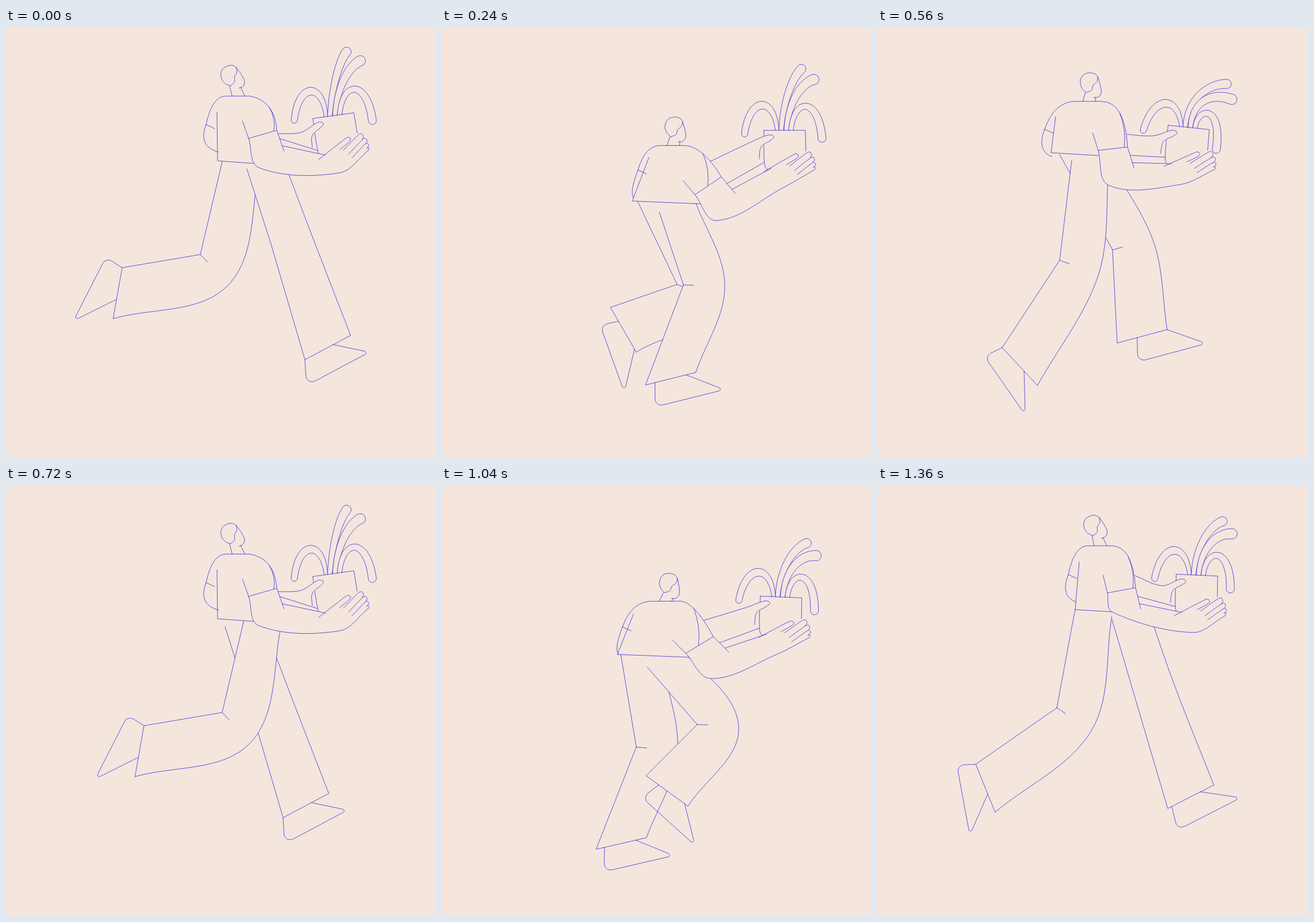
Write an HTML page with a canvas that moves like this. It is 748 px wide and 748 px high and loops after 1440 ms.

```html
<!DOCTYPE html>
<html lang="en">
<head>
<meta charset="utf-8">
<title>Running with a plant</title>
<style>
html, body { margin: 0; width: 100%; height: 100%; overflow: hidden; background: #f4e6dd; }
canvas { display: block; width: 748px; height: 748px; }
</style>
</head>
<body>
<canvas id="stage" width="748" height="748"></canvas>
<script>
const PAPER = '#f4e6dd', INK = 'rgba(52, 44, 220, .78)';
const STEP = 80, STEPS = 18, HALF = 9, HIP_GAP = 38;
const KNEE = 72, HEM = 90, HIP = 65, SOLE = 124, CUFF = 38;
const ctx = document.getElementById('stage').getContext('2d');

// Joints by step: hip, knee, hem, (hem angle, heel offset).
const legAt = track({
  0: '419,245 461,376 520,577 -28,-19',
  3: '378,320 420,447 354,621 -14,7',
  4: '349,293 376,454 306,632 -13,5',
  6: '315,252 278,430 231,611 18,-3',
  7: '337,230 316,404 216,556 47,-10',
  8: '381,214 349,386 208,484 68,-11',
  9: '418,216 376,394 240,417 100,-13',
  12: '378,301 447,446 331,486 60,18',
  13: '357,315 444,415 355,504 36,17',
  15: '331,282 448,390 426,521 10,33',
  16: '354,220 446,386 454,548 -15,26',
  17: '407,232 447,368 504,561 -27,-2'
}, STEPS);

// Head, (head tilt, hand turn), far cuff, shoulder, cuff out and in, hem, elbow, hand, far arm.
const bodyAt = track({
  0: '392,85 -22,-8 348,168 468,127 471,178 422,192 368,231 440,243 597,191 473,184',
  3: '405,175 -2,0 341,247 454,206 486,259 440,290 331,301 478,335 618,220 467,232',
  4: '395,172 3,2.5 314,245 436,195 472,262 424,291 305,293 468,335 610,236 451,235',
  6: '367,144 5,7.5 276,211 414,179 425,238 377,262 268,251 412,312 563,231 416,212',
  7: '369,98 -3,6 290,176 430,127 434,207 383,213 301,217 402,274 558,217 433,185',
  8: '376,71 -20,2.5 331,154 443,105 448,177 399,186 343,215 407,219 575,198 447,156'
}, HALF);

function parse(text) {
  return text.split(' ').map(p => p.split(',').map(Number));
}

// Cyclic cubic interpolation through the key poses.
function track(keys, period) {
  const times = Object.keys(keys).map(Number);
  const poses = times.map(t => parse(keys[t]));
  const n = times.length;
  const timeAt = i => times[(i + n) % n] + Math.floor(i / n) * period;
  const poseAt = i => poses[(i + n) % n];
  return time => {
    const t = time % period;
    let i = n - 1;
    while (times[i] > t) i--;
    const near = [i - 1, i, i + 1, i + 2];
    const [t0, t1, t2, t3] = near.map(timeAt);
    const [A, B, C, D] = near.map(poseAt);
    const h = t2 - t1, u = (t - t1) / h;
    return B.map((p, j) => p.map((b, k) => {
      const c = C[j][k];
      const m1 = (c - A[j][k]) / (t2 - t0) * h;
      const m2 = (D[j][k] - b) / (t3 - t1) * h;
      return b + (c - b) * u * u * (3 - 2 * u) + m1 * u * (1 - u) ** 2 - m2 * u * u * (1 - u);
    }));
  };
}

const clamp = (v, lo = 0, hi = 1) => Math.min(Math.max(v, lo), hi);
const add = (p, q, k = 1) => [p[0] + q[0] * k, p[1] + q[1] * k];
const mix = (p, q, t) => [p[0] + (q[0] - p[0]) * t, p[1] + (q[1] - p[1]) * t];
const polar = deg => [Math.cos(deg * Math.PI / 180), Math.sin(deg * Math.PI / 180)];
const normal = ([x, y]) => [y, -x];

function unit(p, q) {
  const d = Math.hypot(q[0] - p[0], q[1] - p[1]) || 1;
  return [(q[0] - p[0]) / d, (q[1] - p[1]) / d];
}

// Turns local points about an anchor.
function place(text, anchor, deg) {
  const [c, s] = polar(deg);
  return parse(text).map(([x, y]) => add(anchor, [x * c - y * s, x * s + y * c]));
}

// Smooth curve through points.
function curve(pts, joined) {
  const dir = i => unit(pts[Math.max(i - 1, 0)], pts[Math.min(i + 1, pts.length - 1)]);
  joined ? ctx.lineTo(...pts[0]) : ctx.moveTo(...pts[0]);
  for (let i = 1; i < pts.length; i++) {
    const p = pts[i - 1], q = pts[i];
    const h = Math.hypot(q[0] - p[0], q[1] - p[1]) / 3;
    ctx.bezierCurveTo(...add(p, dir(i - 1), h), ...add(q, dir(i), -h), ...q);
  }
}

function line(...pts) {
  pts.forEach((p, i) => i ? ctx.lineTo(...p) : ctx.moveTo(...p));
}

function draw(shape) {
  ctx.beginPath();
  shape();
  ctx.stroke();
}

function mask(shape) {
  ctx.beginPath();
  shape();
  ctx.fill();
}

function drawLeg(pose, dx, opaque) {
  const [hip, knee, hem] = pose.map(p => add(p, [dx, 0]));
  const [hemAngle, offset] = pose[3];
  const thigh = unit(hip, knee), shin = unit(knee, hem), along = polar(hemAngle);
  const across = normal(unit([0, 0], add(thigh, shin)));
  const front = [add(hip, normal(thigh), HIP), add(knee, across, KNEE), add(hem, along, HEM)];
  if (opaque) mask(() => {
    const top = Math.min(hip[1], front[0][1]);
    line(hip, knee, hem);
    curve([...front].reverse(), true);
    ctx.lineTo(front[0][0], top);
    ctx.lineTo(hip[0], top);
  });
  const bent = thigh[0] * shin[1] - thigh[1] * shin[0] > .12;
  draw(() => {
    line(hip, knee, hem, front[2]);
    curve(front);
    if (bent) line(knee, add(knee, across, 18));
  });

  // The shoe hangs from the hem; the ankle bends as the foot lifts.
  const flex = Math.max(hemAngle, 0) * .17;
  const heel = add(add(hem, along, offset), normal(along), Math.min(flex, 10) - 41);
  const toe = add(heel, polar(hemAngle + flex), SOLE);
  const from = clamp((offset + 10) / HEM);
  const back = add(hem, along, HEM * from);
  const instep = add(hem, along, HEM * clamp(from + .62));
  draw(() => {
    ctx.moveTo(...back);
    ctx.arcTo(...heel, ...toe, 11);
    ctx.arcTo(...toe, ...instep, 3);
    ctx.lineTo(...instep);
  });
}

function drawHead(head, tilt, neck) {
  const at = text => place(text, head, tilt);
  draw(() => {
    curve(at('-7,14 -14,7 -17,-4 -12,-16 -2,-20 9,-18 14,-12'));
    curve(at('14,-12 12,-4 5,2 2,10 -7,14'));
    curve(at('14,-12 18,5 18,17 12,23 5,23'));
    const [left, right] = at('-9,14 8,23');
    line(left, add(neck, [-11, 0]));
    line(right, add(neck, [11, 0]));
  });
}

function drawShirt(neck, farCuff, shoulder, cuffOut, cuffIn, hem, elbow) {
  const left = add(neck, [-20, 0]), right = add(neck, [20, 0]);
  const farShoulder = [mix(farCuff, left, .3)[0], neck[1] - 2];
  const hemY = hem[1] + 5;
  const hemEnd = mix(cuffIn, elbow, clamp((hemY - cuffIn[1]) / (elbow[1] - cuffIn[1])));
  const outline = () => {
    ctx.moveTo(...farCuff);
    ctx.quadraticCurveTo(...farShoulder, ...left);
    ctx.lineTo(...right);
    ctx.quadraticCurveTo(...shoulder, ...cuffOut);
  };
  mask(() => {
    outline();
    for (const p of [cuffIn, hemEnd, hem]) ctx.lineTo(...p);
  });
  draw(() => {
    outline();
    line(add(farCuff, [19, -22]), hem, hemEnd);
    line(farCuff, add(farCuff, [15, 7]));
    ctx.moveTo(...farCuff);
    ctx.quadraticCurveTo(farCuff[0] - 15, farCuff[1] + 38, hem[0] + 2, farCuff[1] + 48);

    // Sleeve fold, dropping from the shoulder to the cuff.
    const top = mix(mix(right, shoulder, .5), mix(shoulder, cuffOut, .5), .5);
    const x = Math.min(top[0] + 8, cuffOut[0]);
    const end = mix(cuffIn, cuffOut, (x - cuffIn[0]) / (cuffOut[0] - cuffIn[0]));
    ctx.moveTo(...top);
    ctx.quadraticCurveTo(x + 4, (top[1] + end[1]) / 2, ...end);
  });
}

function drawFarArm(at, start, under) {
  const [wrist, ...thumb] = at('-82,-21 -50,-34 -41,-31 -46,-25 -63,-13');
  const shape = [start, wrist, ...thumb];
  mask(() => curve(shape));
  draw(() => {
    curve([...shape, ...at('-66,8')]);
    line(under, ...at('-58,14'));
  });
}

function drawNearArm(at, cuffOut, cuffIn, elbow) {
  const upper = unit(cuffIn, elbow);
  const cuffEnd = add(cuffOut, upper, CUFF), inner = add(cuffOut, upper, CUFF * .75);
  const [palm, wrist, side, root] = at('-25,58 -45,24 29,27 -58,30');
  const under = [cuffIn, elbow, palm, side];
  mask(() => {
    curve(under);
    for (const p of [...at('31,21 30,10 25,0 20,-4 0,0'), wrist, inner, cuffEnd, cuffOut]) ctx.lineTo(...p);
  });
  draw(() => {
    curve([add(cuffIn, upper, -32), ...under]);
    line(cuffIn, cuffOut, cuffEnd);
    line(inner, wrist);
    curve([root, ...at('-6,0 -1,-1 2,2 0,6 -19,18')]);
    curve(at('-13,20 17,-3 22,-4 25,1 22,6'));
    curve(at('-5,28 23,6 28,5 30,10 27,14'));
    curve(at('0,35 27,14 30,14 32,18 28,22'));
    curve(at('28,22 31,22 31,25 29,27'));
  });
}

// Leaf along a cubic midrib, widening from root to tip.
function drawLeaf(root, c1, c2, end, widths) {
  const N = 28, left = [], right = [];
  const [thin, middle, round] = widths;
  const rib = [[0, 0], c1, c2, end].map(p => add(root, p));
  let angle;
  for (let i = 0; i <= N; i++) {
    const t = i / N;
    const [a, b, c] = [0, 1, 2].map(k => mix(rib[k], rib[k + 1], t));
    const p = mix(a, b, t), q = mix(b, c, t), dir = unit(p, q), mid = mix(p, q, t);
    const w = t < .5 ? thin + (middle - thin) * t * 2 : middle + (round - middle) * (t * 2 - 1);
    angle = Math.atan2(dir[1], dir[0]);
    left.push(add(mid, normal(dir), -w));
    right.unshift(add(mid, normal(dir), w));
  }
  const shape = () => {
    line(...left);
    ctx.arc(...rib[3], round, angle + Math.PI / 2, angle - Math.PI / 2, true);
    right.forEach(p => ctx.lineTo(...p));
  };
  mask(shape);
  draw(shape);
}

function drawStalk(root, tip, widths) {
  drawLeaf(root, [3, -46], [tip[0] * .52, tip[1] * .5 - 38], tip, widths);
}

function drawArch(root, side, rise, tip, widths) {
  drawLeaf(root, [side * 5, rise], [side * 48, rise], tip, widths);
}

function drawPlant(at, turn) {
  const sway = clamp((turn + 1) / 7);
  const roots = at('-35,-42 -28,-42 -19,-42 -11,-42');
  drawArch(roots[0], -1, -60 + 5 * sway, [-55 - 11 * sway, 6], [3, 7, 5.5]);
  drawStalk(roots[1], [29 + 43 * sway, -112 + 37 * sway], [4, 6, 8]);
  drawStalk(roots[2], [44 + 28 * sway, -95 + 46 * sway], [4, 6.5, 9]);
  drawArch(roots[3], 1, -61 + 22 * sway, [57 - 20 * sway, 10 + 27 * sway], [4, 5.5, 7]);
  draw(() => {
    line(...at('15,-6 14,-42 -58,-42'));
    curve(at('-58,-42 -57,17 -50,30'));
  });
}

function render(step) {
  ctx.fillStyle = PAPER;
  ctx.strokeStyle = INK;
  ctx.lineWidth = 1;
  ctx.lineCap = ctx.lineJoin = 'round';
  ctx.fillRect(0, 0, 748, 748);

  const [head, [tilt, turn], farCuff, shoulder, cuffOut, cuffIn, hem, elbow, hand, farArm] = bodyAt(step);
  const neck = add(head, [-4 - .75 * tilt, 29 - .2 * tilt]);
  const carried = text => place(text, hand, turn);

  drawLeg(legAt(step + HALF), -HIP_GAP, false);
  drawLeg(legAt(step), 0, true);
  drawPlant(carried, turn);
  drawFarArm(carried, farArm, add(cuffOut, unit(cuffIn, elbow), CUFF * .4));
  drawShirt(neck, farCuff, shoulder, cuffOut, cuffIn, hem, elbow);
  drawHead(head, tilt, neck);
  drawNearArm(carried, cuffOut, cuffIn, elbow);
}

const start = performance.now();
let shown = -1;
function tick() {
  const step = Math.floor((performance.now() - start) / STEP) % STEPS;
  if (step !== shown) render(shown = step);
  requestAnimationFrame(tick);
}
tick();
</script>
</body>
</html>
```
